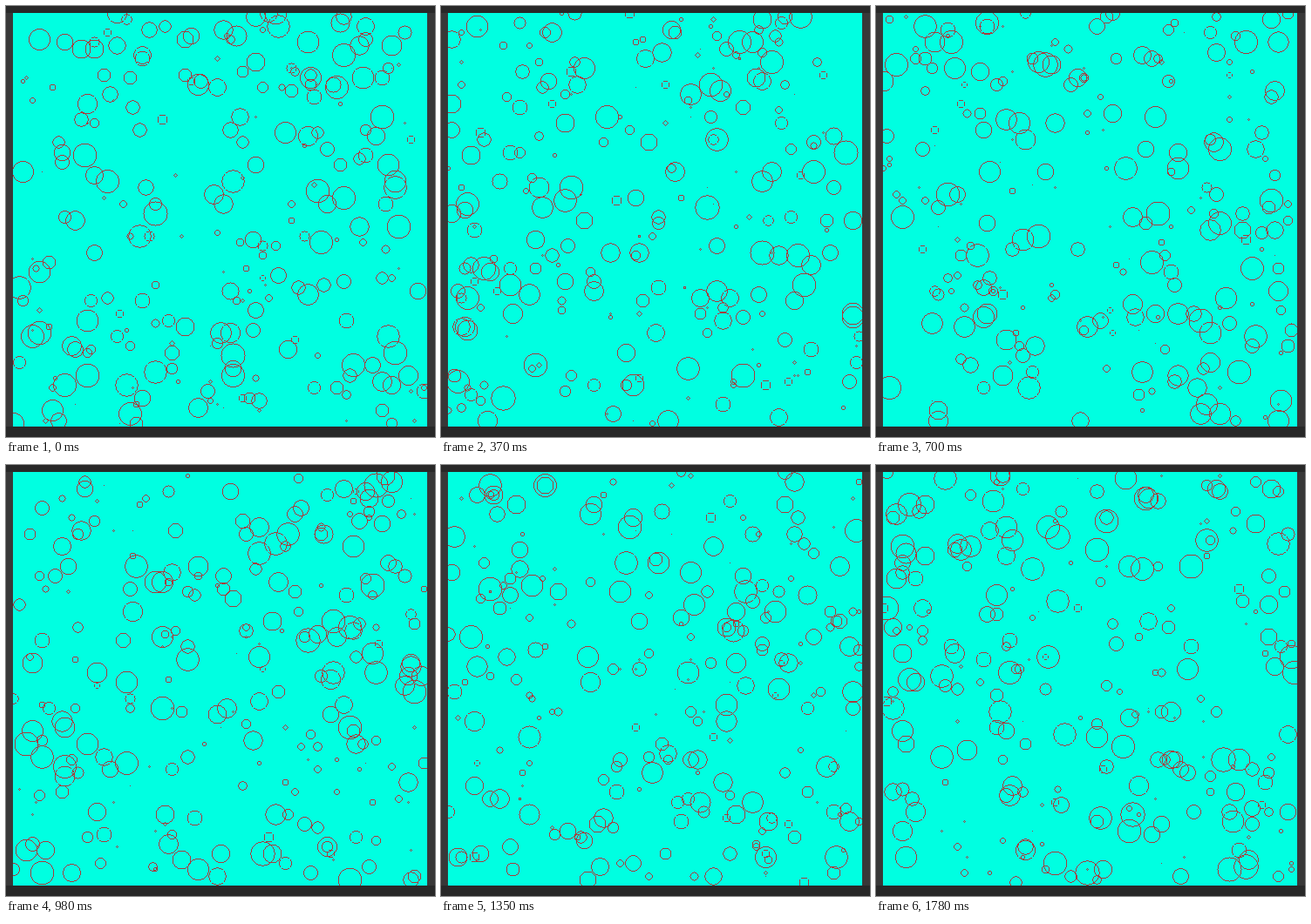
Write an HTML page with a canvas that moves like this. It is 492x495 px and loops after 1.8 s.

```html
<!DOCTYPE html>
<html lang="en">
<head>
<meta charset="utf-8">
<title>Random circles</title>
<style>
  html, body { margin: 0; width: 100%; height: 100%; overflow: hidden; background: #282828; }
  canvas { display: block; }
</style>
</head>
<body>
<canvas id="stage" width="492" height="495"></canvas>
<script>
const ctx = document.getElementById('stage').getContext('2d');
const LOOP = 1800, STEPS = 39, COUNT = 250;
const EDGE = 8, SIZE = 475, CELLS = 128, UNIT = SIZE / CELLS, MAX_RADIUS = 13.7;

// Steps last 50 ms, apart from a few that come early by the given ms.
const early = { 4: 20, 8: 10, 13: 20, 18: 20, 23: 10, 27: 20, 33: 20 };
const starts = [0];
for (let i = 1; i < STEPS; i++) starts.push(starts[i - 1] + 50 - (early[i] || 0));

function seededRandom(seed) {
  return () => {
    seed = (seed + 0x6D2B79F5) | 0;
    let t = Math.imul(seed ^ (seed >>> 15), 1 | seed);
    t = (t + Math.imul(t ^ (t >>> 7), 61 | t)) ^ t;
    return ((t ^ (t >>> 14)) >>> 0) / 4294967296;
  };
}

function fill(color, x, y, w, h) {
  ctx.fillStyle = color;
  ctx.fillRect(x, y, w, h);
}

// One-pixel outline without smoothing, mirrored from one eighth of the circle.
function outline(cx, cy, r) {
  for (let a = 0; a <= r * Math.SQRT1_2; a++) {
    const b = Math.round(Math.sqrt(r * r - a * a));
    for (const [x, y] of [[a, b], [b, a]]) {
      for (const sx of [-x, x]) {
        for (const sy of [-y, y]) ctx.fillRect(cx + sx, cy + sy, 1, 1);
      }
    }
  }
}

function draw(step) {
  const random = seededRandom(step * 7919 + 17);
  const place = () => Math.round(EDGE + Math.floor(random() * CELLS) * UNIT);

  fill('#282828', 0, 0, 492, 495);
  fill('#383838', 0, EDGE, 492, SIZE);

  ctx.save();
  ctx.beginPath();
  ctx.rect(EDGE, EDGE, SIZE, SIZE);
  ctx.clip();
  fill('#00ffe1', EDGE, EDGE, SIZE, SIZE);
  ctx.fillStyle = '#a83c3c';
  for (let i = 0; i < COUNT; i++) outline(place(), place(), random() * MAX_RADIUS);
  ctx.restore();
}

let shown = -1;
function tick() {
  const time = performance.now() % LOOP;
  const step = starts.filter(start => start <= time).length - 1;
  if (step !== shown) draw(shown = step);
  requestAnimationFrame(tick);
}
tick();
</script>
</body>
</html>
```
